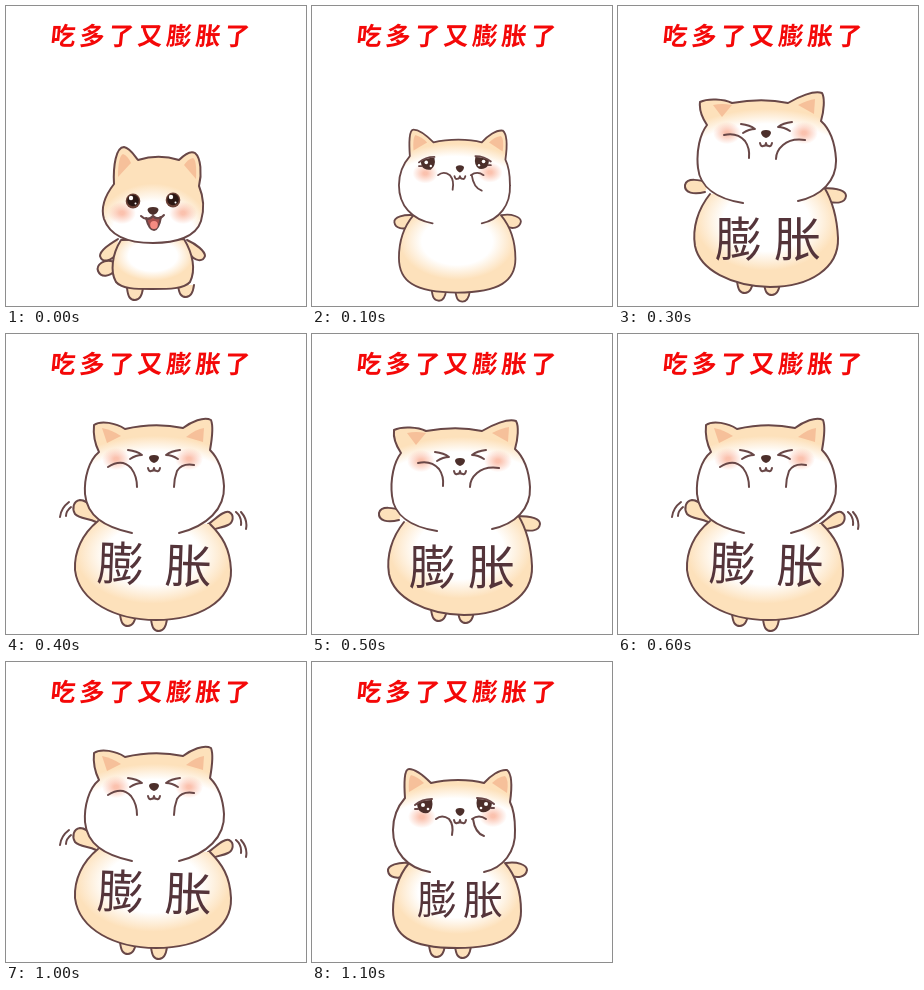
Write an HTML page that moves like this. It is 300x300 px and loops after 1.2 s.

```html
<!DOCTYPE html>
<html lang="zh">
<head>
<meta charset="utf-8">
<style>
  html, body { margin: 0; width: 100%; height: 100%; overflow: hidden; background: #fff; }
  svg { display: block; width: 100vw; height: 100vh; }
  .line { fill: none; stroke: #684747; stroke-width: 2; stroke-linecap: round; stroke-linejoin: round; }
  .dark { fill: #4c2f2b; }
  text { font-family: "Noto Sans CJK SC", "Noto Sans CJK", sans-serif; }
  .title { font-size: 25px; font-weight: 700; letter-spacing: 4px; fill: #f40808; }
  .label { font-weight: 500; fill: #54343a; }
</style>
</head>
<body>
<svg id="stage" viewBox="0 0 300 300">
  <defs>
    <radialGradient id="slim" cx=".5" cy="1" r=".62">
      <stop offset=".7" stop-color="#fff"/><stop offset="1" stop-color="#fde1bb"/>
    </radialGradient>
    <radialGradient id="puffy" cx=".5" cy="1.2" r="1.05">
      <stop offset=".87" stop-color="#fff"/><stop offset="1" stop-color="#fde1bb"/>
    </radialGradient>
    <radialGradient id="belly" cx=".5" cy=".34" r=".55">
      <stop offset=".55" stop-color="#fff"/><stop offset=".9" stop-color="#fde1bb"/>
    </radialGradient>
    <radialGradient id="blush">
      <stop offset=".15" stop-color="#fab7a0" stop-opacity=".85"/>
      <stop offset="1" stop-color="#fab7a0" stop-opacity="0"/>
    </radialGradient>
  </defs>
  <text class="title" x="44" y="39.5" transform="translate(4 0) skewX(-6)">吃多了又膨胀了</text>
</svg>
<script>
const stage = document.getElementById('stage');

const line = (d, extra = '') => `<path class="line" d="${d}" ${extra}/>`;
const shape = (d, fill) => line(d, `style="fill:${fill}"`);
const skin = d => shape(d, '#fde1bb');
const oval = (x, y, rx, ry, fill) => `<ellipse cx="${x}" cy="${y}" rx="${rx}" ry="${ry}" fill="${fill}"/>`;
const blush = (x, y, r = 14) => oval(x, y, r, r * .8, 'url(#blush)');
const innerEar = d => `<path d="${d}" fill="#f6c09a"/>`;
const foot = (x, y) => skin(`M${x - 8} ${y - 12}C${x - 7} ${y - 3} ${x - 5} ${y} ${x} ${y}S${x + 7} ${y - 4} ${x + 8} ${y - 12}`);
const nose = (x, y, w = 5) =>
  `<path class="dark" d="M${x - w} ${y - 1}Q${x - w} ${y - 4} ${x} ${y - 4}T${x + w} ${y - 1}Q${x + w - 1} ${y + 3} ${x} ${y + 4}Q${x - w + 1} ${y + 3} ${x - w} ${y - 1}Z"/>`;
const smile = (x, y) => line(`M${x - 6} ${y - 1}q1 4 3 3q3 0 3-3q0 3 3 3q2 1 3-3`);

const roundEye = (x, y) => oval(x, y, 7.3, 7.5, '#6b4036') + oval(x, y - .5, 5.8, 5.8, '#2b1714') +
  oval(x - 2, y - 3, 2.2, 2.2, '#fff') + oval(x + 2.5, y + 2.5, 1, 1, '#fff');
// side is 1 for the left eye and -1 for the right one
const teary = (x, y, side) => `<g transform="translate(${x} ${y}) scale(${side} 1)">
  <path class="dark" d="M-8-2Q-3-6 7-6Q9 3 3 7Q-4 8-7 3Z"/>
  ${oval(-2, -1, 2, 2, '#fff')}${oval(3, 3, 1.3, 1.3, '#fff')}${line('M-10-1Q-3-7 7-7M-10 3l3 0')}</g>`;
const shut = (x, y, side) => line(`M${x - 14 * side} ${y - 5}Q${x - 5 * side} ${y - 4} ${x} ${y}Q${x - 6 * side} ${y} ${x - 12 * side} ${y + 4}`);
const label = (x, y, size, gap) =>
  `<text class="label" x="${x}" y="${y}" font-size="${size}" letter-spacing="${gap}">膨胀</text>`;

const slim =
  skin('M108 256C98 252 90 259 92 265C95 272 104 271 109 264') +
  foot(129, 294) + foot(180, 291) +
  skin('M112 233C104 238 94 244 94 250C96 257 105 256 111 247') +
  skin('M181 234C190 238 199 245 199 250C197 256 189 256 183 247') +
  shape('M115 234C106 248 104 266 110 276C116 283 130 283 146 283C163 283 178 283 184 276C190 264 187 248 178 233Z', 'url(#belly)') +
  shape('M108 178C107 160 110 141 118 141C124 142 128 149 132 154C145 150 160 150 173 154C178 149 184 144 189 147C195 152 196 168 193 180C198 192 198 205 195 215C190 231 170 237 147 237C122 237 104 230 98 213C94 200 101 187 108 178Z', 'url(#slim)') +
  innerEar('M112 171Q112 150 117 148Q122 150 125 157Z') + innerEar('M190 173Q191 154 187 152Q182 153 178 159Z') +
  blush(116, 207) + blush(177, 207) +
  roundEye(127, 195) + roundEye(167, 194) +
  shape('M140 212Q143 224 148 224Q153 223 155 211Q150 214 147 210Q144 214 140 212Z', '#a64f4c') +
  oval(148, 219, 3.8, 4, '#f58c82') +
  line('M135 210Q141 216 147 210Q153 215 158 209') + nose(147, 205, 5.5);

const full =
  foot(125, 295) + foot(151, 296) +
  skin('M97 201C87 200 75 203 76 209C77 216 86 217 93 214') +
  skin('M194 201C205 199 215 203 215 208C214 215 205 217 199 213') +
  shape('M97 201C86 214 81 232 81 248C81 273 97 286 145 286C192 286 209 273 209 249C209 232 204 214 193 201', 'url(#belly)') +
  shape('M172 210C191 206 204 190 203 168C203 158 202 148 198 140C200 126 200 112 195 108C188 107 178 114 172 121C158 117 135 117 119 121C112 114 104 107 97 107C92 107 92 122 93 136C86 144 81 156 81 168C81 190 95 206 118 210', 'url(#puffy)') +
  innerEar('M97 130Q96 116 99 113Q106 115 112 121Z') + innerEar('M195 131Q197 117 193 114Q186 115 180 121Z') +
  blush(110, 155) + blush(181, 154) +
  teary(113, 144, 1) + teary(172, 143, -1) +
  nose(148, 150, 4.5) + smile(148, 159) +
  line('M124 157Q130 152 137 157Q142 163 140 173') + line('M160 157Q167 152 174 157M161 157Q163 171 172 174');

const squeezed =
  foot(127, 287) + foot(154, 289) +
  skin('M91 177C82 174 69 171 67 179C66 187 76 189 87 186') +
  skin('M204 182C214 182 228 183 228 190C227 198 218 197 210 196') +
  shape('M92 188C80 203 74 222 77 240C82 264 113 280 152 281C192 281 221 262 220 232C219 210 214 194 206 181', 'url(#belly)') +
  shape('M180 195C203 190 219 175 218 153C217 138 213 124 203 115C206 105 207 92 204 87C196 84 180 91 170 97C152 93 130 94 114 97C106 93 90 92 82 96C81 104 85 113 89 119C82 128 78 145 80 162C82 182 100 193 125 197', 'url(#puffy)') +
  innerEar('M95 99Q104 97 114 99L104 111Z') + innerEar('M180 99Q190 94 197 93L196 108Z') +
  blush(109, 127) + blush(186, 127) +
  shut(137, 123, 1) + shut(160, 121, -1) +
  nose(148, 128) + smile(148, 138) +
  line('M106 129Q119 126 127 135Q132 142 131 152') + line('M187 134Q173 132 165 139Q158 145 158 153') +
  label(97, 250, 47, 12);

const stuffed =
  foot(122, 292) + foot(153, 297) +
  skin('M94 179C86 174 82 166 74 166C67 167 66 175 69 180C74 185 82 184 90 188') +
  skin('M202 190C209 186 217 176 223 178C229 181 227 189 222 191C216 194 213 193 207 196') +
  shape('M92 187C76 200 68 218 69 236C73 268 110 286 150 286C192 286 226 268 225 236C224 214 216 202 204 190', 'url(#belly)') +
  shape('M173 199C201 192 219 175 218 152C217 136 212 124 204 116C206 105 207 91 205 86C198 82 185 88 177 94C158 90 136 91 119 95C110 89 95 86 88 91C87 101 90 112 93 118C83 126 78 144 79 160C81 182 98 193 126 199', 'url(#puffy)') +
  innerEar('M96 94Q106 96 115 102L101 109Z') + innerEar('M180 103Q190 95 198 94L197 108Z') +
  blush(110, 125) + blush(183, 125) +
  shut(136, 121, 1) + shut(160, 121, -1) +
  nose(148, 125) + smile(148, 135) +
  line('M102 133Q116 124 125 134Q131 142 131 153') + line('M188 131Q176 129 171 137Q168 145 168 153') +
  line('M63 168Q55 174 54 183M65 173Q60 177 60 182') + line('M230 178Q236 183 235 191M235 178Q242 186 240 195') +
  `<g transform="rotate(2 149 230)">${label(91, 248, 47, 21)}</g>`;

const poses = {
  a: slim,
  m: `<g transform="translate(147 292) scale(.91) translate(-147 -292)">${full}</g>`,
  b: full + label(105, 252, 40, 6),
  c: squeezed,
  d: stuffed
};
for (const name in poses) {
  stage.insertAdjacentHTML('beforeend', `<g id="${name}" visibility="hidden">${poses[name]}</g>`);
}

// grow, wobble between the two biggest poses, then deflate
const steps = 'ambcdcdcdcdb';
const stepMs = 100;
const start = performance.now();
let shown;

function draw(now) {
  const step = Math.floor(Math.max(0, now - start) / stepMs) % steps.length;
  const next = document.getElementById(steps[step]);
  if (next !== shown) {
    if (shown) shown.setAttribute('visibility', 'hidden');
    next.setAttribute('visibility', 'visible');
    shown = next;
  }
  requestAnimationFrame(draw);
}
draw(start);
</script>
</body>
</html>
```
